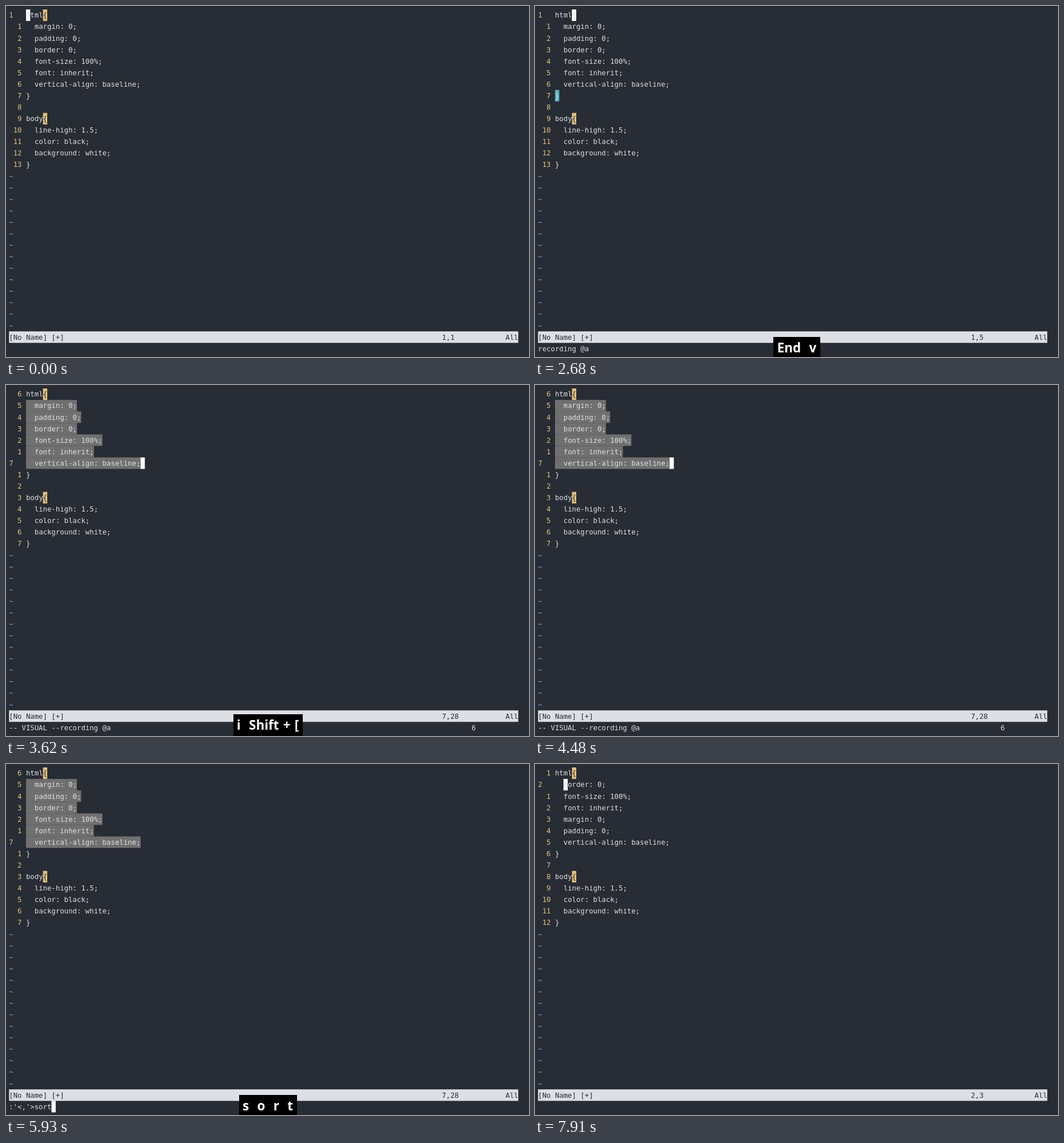
These frames come from a looping animation (913 by 613 pixels, 8.31 s). An HTML page:

```html
<!DOCTYPE html>
<html lang="en">
<head>
<meta charset="utf-8">
<title>Recording a macro that sorts CSS</title>
<style>
  html, body { margin: 0; width: 100%; height: 100%; overflow: hidden; background: #282c34; }
  svg { display: block; width: 913px; height: 613px; }
  text { white-space: pre; }
  #screen { font: 12.305px "DejaVu Sans Mono", monospace; }
  #keys text { font: bold 22.5px "Open Sans", "Noto Sans", sans-serif; word-spacing: 1.3px; text-anchor: middle; fill: #fff; }
</style>
</head>
<body>
<svg viewBox="0 0 913 613">
  <g id="screen"></g>
  <g id="keys"><rect fill="#000"/><text x="457"></text></g>
</svg>
<script>
const LOOP = 8310;
const LEFT = 5.3, TOP = 6, CELL = 7.408, ROW = 20.08;
const STATUS = 28, COMMAND = 29, GUTTER = 4;
const FG = '#dcdfe4', BG = '#282c34', YELLOW = '#e5c07b', BLUE = '#61afef',
      CYAN = '#56b6c2', GREY = '#707070', WHITE = '#ffffff';

const rules = ['  margin: 0;', '  padding: 0;', '  border: 0;',
  '  font-size: 100%;', '  font: inherit;', '  vertical-align: baseline;'];
const page = list => ['html{', ...list, '}', '', 'body{',
  '  line-high: 1.5;', '  color: black;', '  background: white;', '}'];
const unsorted = page(rules), sorted = page([...rules].sort());

const REC = 'recording @a', VISUAL = '-- VISUAL --' + REC, RANGE = ":'<,'>";

// Each step changes only the named parts of the editor state.
const steps = [
  [0, { lines: unsorted, line: 0, cursor: [0, 4], pos: '1,1', cmd: '', pending: '', keys: '', selected: false, match: false }],
  [200, { keys: 'q' }],
  [270, { pending: 'q' }],
  [670, { keys: 'q  a' }],
  [740, { cmd: REC, pending: '' }],
  [1130, { keys: 'a' }],
  [1590, { keys: '' }],
  [1990, { keys: 'End' }],
  [2060, { cursor: [0, 8], pos: '1,5', match: true }],
  [2680, { keys: 'End  v' }],
  [2750, { cmd: VISUAL, pending: '1' }],
  [2820, { keys: 'End  v  i' }],
  [2890, { keys: 'v  i', pending: 'i' }],
  [3210, { keys: 'v  i  Shift' }],
  [3550, { keys: 'v  i  Shift + [' }],
  [3620, { keys: 'i  Shift + [', line: 6, cursor: [6, 31], pos: '7,28', pending: '6', selected: true, match: false }],
  [3750, { keys: 'Shift + [' }],
  [4480, { keys: '' }],
  [4740, { keys: 'Shift' }],
  [4870, { keys: 'Shift + ;' }],
  [4940, { cmd: RANGE, cursor: [COMMAND, 6], pending: '' }],
  [5200, { keys: 'Shift + ;  s' }],
  [5270, { cmd: RANGE + 's', cursor: [COMMAND, 7] }],
  [5330, { cmd: RANGE + 'so', cursor: [COMMAND, 8] }],
  [5400, { keys: 'Shift + ;  s  o' }],
  [5470, { keys: 'Shift + ;  s  o  r', cmd: RANGE + 'sor', cursor: [COMMAND, 9] }],
  [5670, { keys: 'Shift + ;  s  o  r  t', cmd: RANGE + 'sort', cursor: [COMMAND, 10] }],
  [5800, { keys: 's  o  r  t' }],
  [5940, { keys: 'o  r  t  Enter' }],
  [6000, { lines: sorted, line: 1, cursor: [1, 6], pos: '2,3', cmd: REC, selected: false }],
  [6130, { keys: 'r  t  Enter' }],
  [6330, { keys: 't  Enter' }],
  [6600, { keys: 'Enter' }],
  [6860, { keys: '' }],
  [6990, { keys: 'q' }],
  [7060, { cmd: '' }],
  [7910, { keys: '' }]
];

const screenEl = document.getElementById('screen');
const keysEl = document.getElementById('keys');
const [keyBox, keyText] = keysEl.children;

const escapeText = s => s.replace(/&/g, '&amp;').replace(/</g, '&lt;').replace(/>/g, '&gt;');
const block = (row, col, count, fill) =>
  `<rect x="${LEFT + col * CELL}" y="${TOP + row * ROW}" width="${count * CELL}" height="${ROW}" fill="${fill}"/>`;
const write = (row, col, str, fill = FG) =>
  `<text x="${LEFT + col * CELL}" y="${TOP + row * ROW + 14.4}" fill="${fill}">${escapeText(str)}</text>`;

function drawScreen(s) {
  const [curRow, curCol] = s.cursor;
  let back = block(STATUS, 0, 120, FG), front = '';
  s.lines.forEach((str, row) => {
    const number = row === s.line ? String(row + 1) : String(Math.abs(row - s.line)).padStart(3);
    front += write(row, 0, number, YELLOW);
    if (s.selected && row > 0 && row < 7) back += block(row, GUTTER, str.length, GREY);
    if (str.endsWith('{')) {
      const col = GUTTER + str.length - 1;
      const covered = row === curRow && col === curCol;
      back += block(row, col, 1, YELLOW);
      front += write(row, GUTTER, str.slice(0, -1)) + write(row, col, '{', covered ? FG : BG);
    } else {
      front += write(row, GUTTER, str);
    }
  });
  if (s.match) back += block(7, GUTTER, 1, CYAN);
  for (let row = s.lines.length; row < STATUS; row++) front += write(row, 0, '~', BLUE);
  back += block(curRow, curCol, 1, WHITE);
  front += write(STATUS, 0, '[No Name] [+]', BG) + write(STATUS, 102, s.pos, BG) + write(STATUS, 117, 'All', BG);
  front += write(COMMAND, 0, s.cmd) + write(COMMAND, 109, s.pending);
  screenEl.innerHTML = back + front;
}

function drawKeys(label) {
  keysEl.style.display = label ? '' : 'none';
  if (!label) return;
  keyText.textContent = label;
  const width = Math.round(keyText.getComputedTextLength() + 13);
  const top = label.includes('+') ? 575 : label === 'a' ? 581 : label.endsWith('Enter') ? 579 : 578;
  keyBox.setAttribute('x', Math.round(457 - width / 2));
  keyBox.setAttribute('y', top);
  keyBox.setAttribute('width', width);
  keyBox.setAttribute('height', 613 - top);
  keyText.setAttribute('y', label.includes('+') ? 602 : 604.5);
}

let shown = -1;
function render(time) {
  let last = 0;
  while (last + 1 < steps.length && steps[last + 1][0] <= time) last++;
  if (last === shown) return;
  shown = last;
  const state = Object.assign({}, ...steps.slice(0, last + 1).map(step => step[1]));
  drawScreen(state);
  drawKeys(state.keys);
}

const start = performance.now();
function tick() {
  render((performance.now() - start) % LOOP);
  requestAnimationFrame(tick);
}
tick();
</script>
</body>
</html>
```
